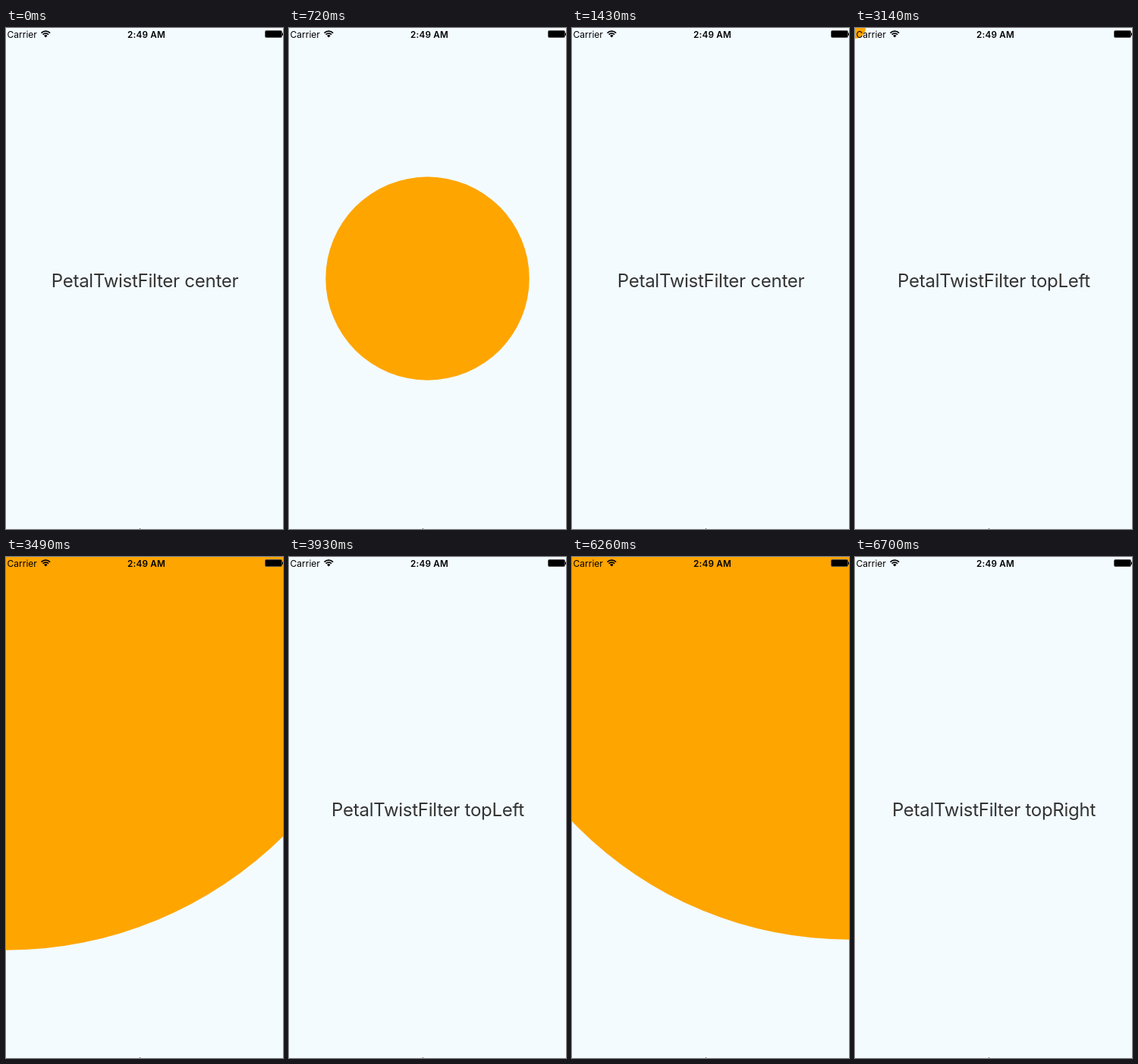
An HTML page with a canvas that plays this animation: 365x661 px, repeating every 8 s.

```html
<!DOCTYPE html>
<html lang="en">
<head>
<meta charset="utf-8">
<title>Circle reveal</title>
<style>
  html, body { margin: 0; width: 100%; height: 100%; overflow: hidden; background: #f3fbff; }
  canvas { display: block; width: 365px; height: 661px; }
</style>
</head>
<body>
<canvas id="stage"></canvas>
<script>
const W = 365, H = 661, LOOP = 8000;
const TICK = 87, GROWTH = 126.2; // screen refresh in ms, radius gained per refresh
const PAPER = '#f3fbff', ORANGE = '#ffa500';
const FONT = 'Inter, Roboto, sans-serif';

const scenes = [
  { name: 'center',   from: 0,    start: 630,  end: 1430, x: W / 2, y: H / 2, r: 8 },
  { name: 'topLeft',  from: 3140, start: 3140, end: 3930, x: 0,     y: 0,     r: 14 },
  { name: 'topRight', from: 5910, start: 5910, end: 6700, x: W,     y: 0,     r: 0 }
];

const canvas = document.getElementById('stage');
const ctx = canvas.getContext('2d');
const dpr = window.devicePixelRatio || 1;
canvas.width = W * dpr;
canvas.height = H * dpr;
ctx.scale(dpr, dpr);

function text(str, x, y, font, color, align, spacing = 0) {
  ctx.font = `${font} ${FONT}`;
  ctx.letterSpacing = `${spacing}px`;
  ctx.textAlign = align;
  ctx.fillStyle = color;
  ctx.fillText(str, x, y);
}

function disc(x, y, r, color) {
  ctx.fillStyle = color;
  ctx.beginPath();
  ctx.arc(x, y, r, 0, Math.PI * 2);
  ctx.fill();
}

function wifi(x, y) {
  const a = Math.PI * 0.25;
  ctx.strokeStyle = ctx.fillStyle = '#000';
  ctx.lineWidth = 1.7;
  for (const r of [8.2, 5.3]) {
    ctx.beginPath();
    ctx.arc(x, y, r, -Math.PI / 2 - a, -Math.PI / 2 + a);
    ctx.stroke();
  }
  ctx.beginPath();
  ctx.moveTo(x, y);
  ctx.arc(x, y, 3.2, -Math.PI / 2 - a, -Math.PI / 2 + a);
  ctx.fill();
}

function battery() {
  ctx.strokeStyle = '#555';
  ctx.lineWidth = 1;
  ctx.beginPath();
  ctx.roundRect(341.5, 3.5, 22, 9, 1.2);
  ctx.stroke();
  ctx.fillStyle = '#000';
  ctx.fillRect(342, 4, 21, 8);
  ctx.fillRect(364, 6.5, 1, 3.4);
}

function statusBar() {
  text('Carrier', 1.6, 13, '400 12px', '#000', 'left');
  wifi(52.3, 12.4);
  text('2:49 AM', 185, 13, '600 11.7px', '#000', 'center', 0.25);
  battery();
}

// Tip of the mouse pointer at the bottom edge
function pointer() {
  ctx.fillStyle = '#fff';
  ctx.beginPath();
  ctx.moveTo(175, 657);
  ctx.lineTo(179, 661);
  ctx.lineTo(175, 661);
  ctx.fill();
  ctx.fillStyle = '#444';
  ctx.fillRect(176, 660, 1, 1);
}

function draw(t) {
  const s = scenes.filter(scene => t >= scene.from).pop();
  ctx.fillStyle = PAPER;
  ctx.fillRect(0, 0, W, H);
  text(`PetalTwistFilter ${s.name}`, 183, 342, '400 24px', '#333', 'center', -0.26);
  if (t >= s.start && t < s.end) {
    const ticks = Math.floor((t - s.start) / TICK);
    disc(s.x, s.y, s.r + GROWTH * ticks, ORANGE);
  }
  statusBar();
  pointer();
}

function loop() {
  draw(performance.now() % LOOP);
  requestAnimationFrame(loop);
}
loop();
</script>
</body>
</html>
```
